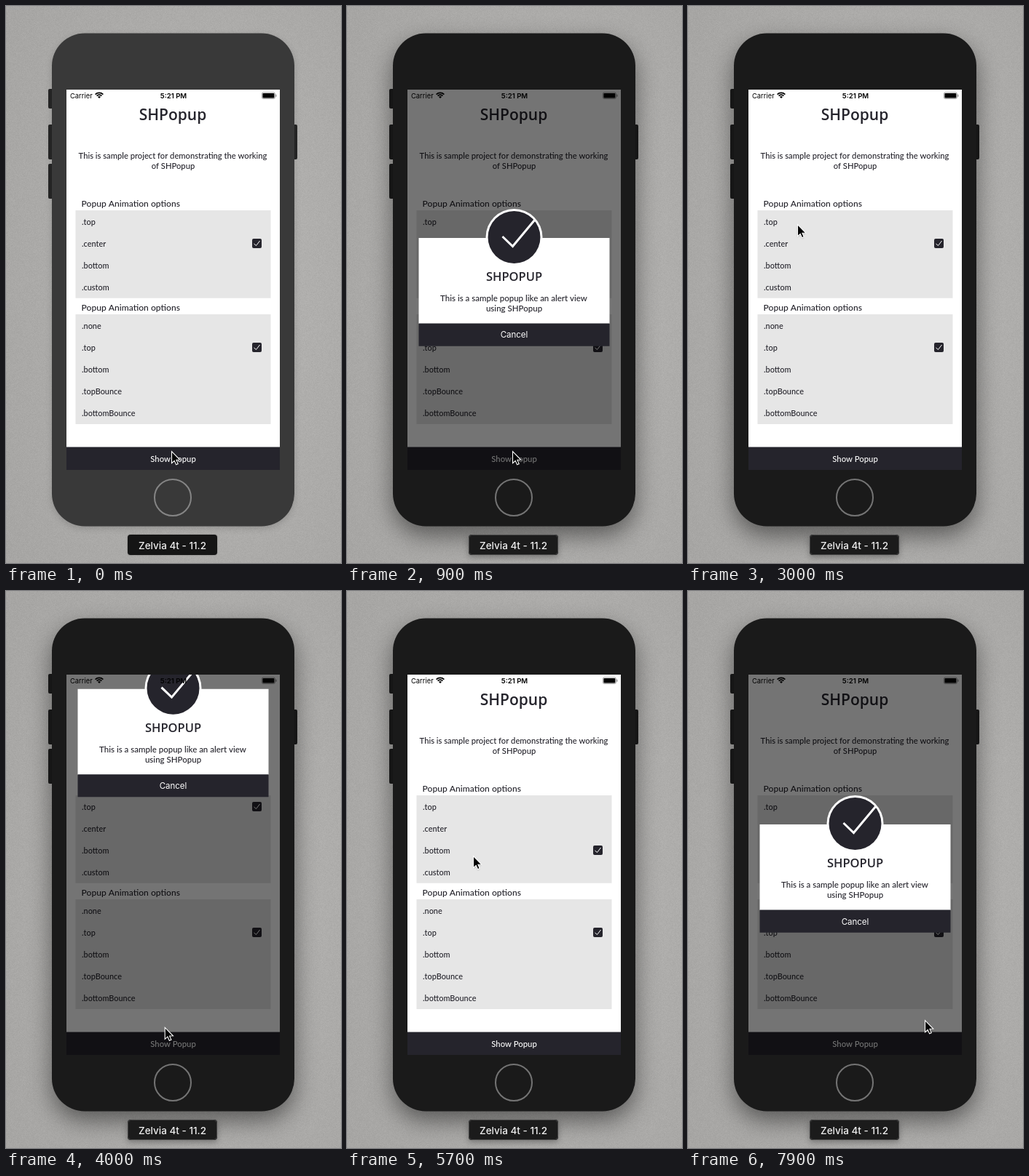
These frames come from a looping animation (460x766 px, 8000 ms). An HTML page with a canvas:

```html
<!DOCTYPE html>
<html lang="en">
<head>
<meta charset="utf-8">
<title>Popup demo</title>
<style>
  html, body { margin: 0; width: 100%; height: 100%; overflow: hidden; background: #acaba9; }
  canvas { display: block; }
</style>
</head>
<body>
<canvas id="stage" width="460" height="766"></canvas>
<script>
const W = 460, H = 766, LOOP = 8000;
const ctx = document.getElementById('stage').getContext('2d');
const INK = '#25242c';
const GEO = 'Lato, "Open Sans", sans-serif';
const UI = 'Inter, Roboto, sans-serif';
const HAND = '"Open Sans", "Noto Sans", sans-serif';
const SCREEN = { x: 83, y: 115, w: 293, h: 523 };
const CENTER_Y = 321, TOP_Y = 175, HIDDEN_Y = -34;

const clamp = v => Math.max(0, Math.min(1, v));
const mix = (a, b, p) => a + (b - a) * p;
const smooth = p => p * p * (3 - 2 * p);
const easeIn = p => p * p;
const easeOut = p => 1 - Math.pow(1 - p, 3);

// Popup visits: opening start, resting place, closing start
const visits = [
  { open: 490, y: CENTER_Y, close: 1642 },
  { open: 3790, y: TOP_Y, close: 4477 },
  { open: 7290, y: CENTER_Y, close: Infinity }
];
const OPEN = 500, CLOSE = 340, FADE = 130;

// Cursor tip: time, x, y
const path = [
  [1200, 227, 612], [1600, 244, 567], [1900, 243, 567], [2100, 240, 568],
  [2800, 151, 317], [2900, 151, 317], [3000, 150, 300], [3200, 149, 299],
  [3600, 215, 615], [3950, 215, 615], [4300, 262, 348], [4800, 260, 345],
  [5300, 160, 353], [5400, 159, 357], [5500, 159, 357], [5700, 173, 364],
  [5800, 173, 364], [6400, 190, 387], [6900, 190, 387], [7200, 335, 596],
  [7300, 327, 615], [7800, 327, 615], [7900, 325, 590]
];

function cursorAt(t) {
  const i = path.findIndex(k => k[0] > t);
  if (i === 0) return path[0].slice(1);
  if (i < 0) return path[path.length - 1].slice(1);
  const a = path[i - 1], b = path[i];
  const p = smooth((t - a[0]) / (b[0] - a[0]));
  return [mix(a[1], b[1], p), mix(a[2], b[2], p)];
}

function rect(x, y, w, h, fill, r = 0) {
  ctx.fillStyle = fill;
  ctx.beginPath();
  ctx.roundRect(x, y, w, h, r);
  ctx.fill();
}

function outline(x, y, w, h, color, width, r) {
  ctx.strokeStyle = color;
  ctx.lineWidth = width;
  ctx.beginPath();
  ctx.roundRect(x, y, w, h, r);
  ctx.stroke();
}

function disc(x, y, r, fill) {
  ctx.fillStyle = fill;
  ctx.beginPath();
  ctx.arc(x, y, r, 0, Math.PI * 2);
  ctx.fill();
}

function line(points, color, width) {
  ctx.strokeStyle = color;
  ctx.lineWidth = width;
  ctx.beginPath();
  points.forEach(([x, y]) => ctx.lineTo(x, y));
  ctx.stroke();
}

function text(s, x, y, font, color = INK, align = 'center') {
  ctx.font = font;
  ctx.fillStyle = color;
  ctx.textAlign = align;
  ctx.fillText(s, x, y);
}

// Slightly warm, grainy wall, brightest right of the middle
function makeWall() {
  const c = document.createElement('canvas');
  c.width = W;
  c.height = H;
  const g = c.getContext('2d');
  const img = g.createImageData(W, H);
  let seed = 7;
  const rnd = () => (seed = (seed * 16807) % 2147483647) / 2147483647;
  for (let i = 0; i < W * H; i++) {
    const x = i % W / W, y = Math.floor(i / W) / H;
    const glow = 16 * Math.exp(-Math.pow((x - .6) / .55, 2) - Math.pow((y - .5) / .6, 2));
    const v = 163 + glow + (rnd() + rnd() - 1) * 6;
    img.data.set([v + 1, v, v - 2, 255], i * 4);
  }
  g.putImageData(img, 0, 0);
  return c;
}
const wall = makeWall();

function shadow(color, blur, dy) {
  ctx.shadowColor = color;
  ctx.shadowBlur = blur;
  ctx.shadowOffsetY = dy;
}

function drawDevice(active) {
  const body = active ? '#1a1a1a' : '#393939';
  const key = active ? '#1c1c1c' : '#262626';
  [[58, 114, 27], [58, 163, 48], [58, 217, 48], [390, 163, 48]]
    .forEach(([x, y, h]) => rect(x, y, 10, h, key, 2));
  ctx.save();
  shadow(active ? 'rgba(0,0,0,.48)' : 'rgba(0,0,0,.16)', active ? 32 : 10, active ? 13 : 3);
  rect(63, 37.5, 333, 678, body, 45);
  ctx.restore();
  ctx.strokeStyle = active ? '#747474' : '#858585';
  ctx.lineWidth = 2;
  ctx.beginPath();
  ctx.arc(229, 676, 25, 0, Math.PI * 2);
  ctx.stroke();

  ctx.save();
  shadow('rgba(0,0,0,.3)', active ? 8 : 2, active ? 3 : 0);
  rect(167, 727, 123, 28, active ? '#1b1b1b' : '#151515', 4);
  ctx.restore();
  if (active) outline(167.5, 727.5, 122, 27, '#444', 1, 4);
  text('Zelvia 4t - 11.2', 228.5, 747, '500 13.5px ' + UI, '#eee');
}

function drawCheckbox(y) {
  const top = Math.round(y - 6.5);
  rect(338, top, 13, 13, INK, 2);
  line([[340.5, top + 7], [343.5, top + 9.5], [348.5, top + 3]], '#fff', 1);
}

function drawList(top, rows, checked) {
  text('Popup Animation options', 103.5, top - 5, '500 12.1px ' + GEO, INK, 'left');
  rect(95.5, top, 268, rows.length * 30.2, '#e6e6e6');
  rows.forEach((name, i) => {
    const y = top + 15.5 + i * 30.2;
    text(name, 104, Math.round(y + 4), '500 10.9px ' + GEO, INK, 'left');
    if (i === checked) drawCheckbox(y);
  });
}

function drawPage(t) {
  rect(SCREEN.x, SCREEN.y, SCREEN.w, SCREEN.h, '#fff');
  text('SHPopup', 229, 157, '600 21px ' + HAND);
  text('This is sample project for demonstrating the working', 229, 210, '500 11.2px ' + GEO);
  text('of SHPopup', 229.5, 224, '500 11.2px ' + GEO);
  const place = t < 3200 ? 1 : t < 5600 ? 0 : t < 6700 ? 2 : 3;
  drawList(281, ['.top', '.center', '.bottom', '.custom'], place);
  drawList(424, ['.none', '.top', '.bottom', '.topBounce', '.bottomBounce'], 1);
  rect(83, 606.5, 293, 31.5, INK);
  text('Show Popup', 229.5, 627, '500 11.3px ' + GEO, '#fff');
}

function drawPopup(y) {
  const cx = 229.5, cy = y - 1;
  rect(98.5, y, 262, 118, '#fff');
  rect(98.5, y + 117.5, 262, 31.2, INK);
  disc(cx, cy, 39, '#fff');
  disc(cx, cy, 36, INK);
  line([[cx - 16, cy - 1], [cx - 2, cy + 12.5], [cx + 28, cy - 23.5]], '#fff', 3);
  text('SHPOPUP', 229.5, y + 59, '600 16.5px ' + HAND);
  text('This is a sample popup like an alert view', 229, y + 87, '500 11.5px ' + GEO);
  text('using SHPopup', 229.5, y + 101, '500 11.5px ' + GEO);
  text('Cancel', 229.5, y + 137.5, '11.5px ' + UI, '#fff');
}

function drawStatus() {
  text('Carrier', 88, 126.5, '9.4px ' + UI, '#000', 'left');
  text('5:21 PM', 230, 126.5, '600 9.6px ' + UI, '#000');
  ctx.strokeStyle = '#000';
  ctx.lineWidth = 1.7;
  [4.8, 7.6].forEach(r => {
    ctx.beginPath();
    ctx.arc(128, 127, r, -Math.PI * .75, -Math.PI * .25);
    ctx.stroke();
  });
  ctx.fillStyle = '#000';
  ctx.beginPath();
  ctx.moveTo(128, 127);
  ctx.arc(128, 127, 2.8, -Math.PI * .75, -Math.PI * .25);
  ctx.fill();
  outline(351.4, 118.9, 18, 8.6, 'rgba(0,0,0,.45)', .8, 2);
  rect(352.4, 119.9, 16, 6.6, '#000', 1);
  rect(370.3, 121.5, 1.2, 3.4, 'rgba(0,0,0,.45)', .6);
}

function drawVisit(t) {
  const v = visits.find(v => t >= v.open && t < v.close + CLOSE + FADE);
  if (!v) return;
  const out = t - v.close;
  const dim = clamp((t - v.open) / 200) * (1 - clamp((out - CLOSE) / FADE));
  rect(SCREEN.x, SCREEN.y, SCREEN.w, SCREEN.h, `rgba(0,0,0,${.545 * dim})`);
  const y = out > 0
    ? mix(v.y, HIDDEN_Y, easeIn(clamp(out / CLOSE)))
    : mix(HIDDEN_Y, v.y, easeOut(clamp((t - v.open) / OPEN)));
  if (y > HIDDEN_Y) drawPopup(y);
}

function drawCursor(x, y) {
  const pts = [[0, 0], [0, 16], [3.7, 12.6], [6.1, 18], [8.7, 16.9], [6.4, 11.6], [11.3, 11.4]];
  ctx.save();
  ctx.translate(x + .5, y + .7);
  shadow('rgba(0,0,0,.35)', 2, 1);
  ctx.beginPath();
  pts.forEach(p => ctx.lineTo(...p));
  ctx.closePath();
  ctx.fillStyle = '#000';
  ctx.fill();
  ctx.shadowColor = 'transparent';
  ctx.strokeStyle = '#fff';
  ctx.lineWidth = 1.1;
  ctx.stroke();
  ctx.restore();
}

function draw(t) {
  ctx.drawImage(wall, 0, 0);
  drawDevice(t >= 500);
  ctx.save();
  ctx.beginPath();
  ctx.rect(SCREEN.x, SCREEN.y, SCREEN.w, SCREEN.h);
  ctx.clip();
  drawPage(t);
  drawVisit(t);
  drawStatus();
  ctx.restore();
  drawCursor(...cursorAt(t));
}

const start = performance.now();
function tick() {
  draw((performance.now() - start) % LOOP);
  requestAnimationFrame(tick);
}
tick();
</script>
</body>
</html>
```
